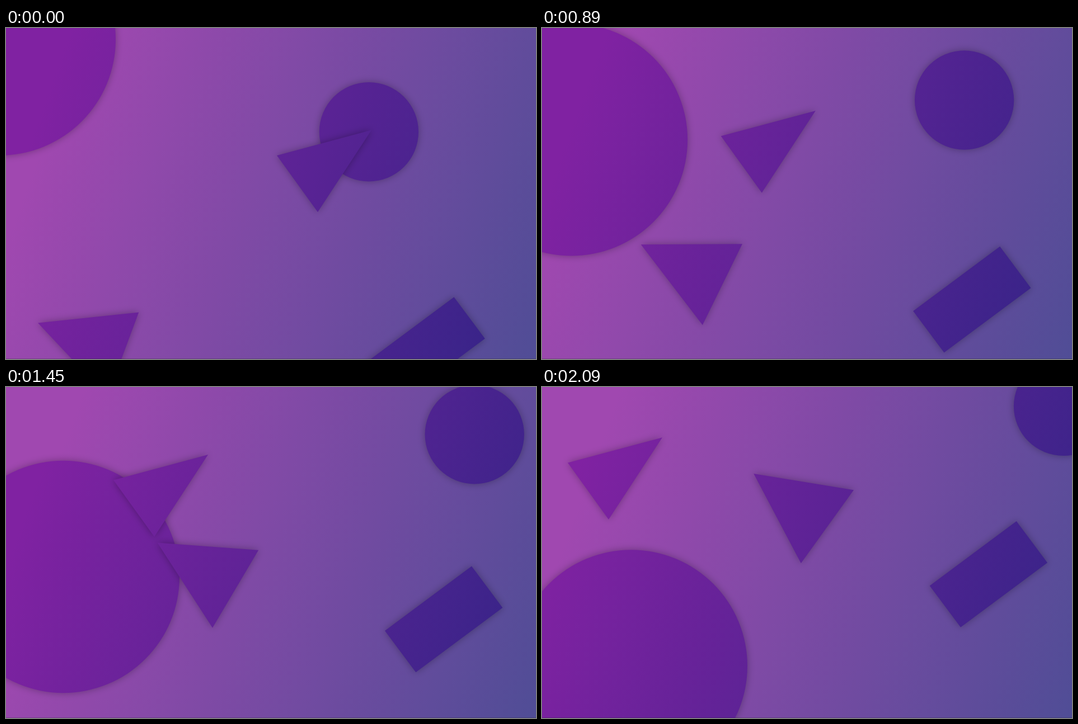
An HTML page with a canvas for the animation above (2.17 s loop, 947 px wide and 592 px high).

```html
<!DOCTYPE html>
<html lang="en">
<head>
<meta charset="utf-8">
<title>Drifting shapes</title>
<style>
html, body { margin: 0; width: 100%; height: 100%; overflow: hidden; background: #7f4ba5; }
canvas { display: block; }
</style>
</head>
<body>
<canvas id="stage" width="947" height="592"></canvas>
<script>
const W = 947, H = 592, LOOP = 2170, HOLD = 250, STEP = 80;
const ctx = document.getElementById('stage').getContext('2d');

// Diagonal gradient spanning the stage at 110 degrees
function diagonal(from, to, start) {
  const a = 20 * Math.PI / 180, c = Math.cos(a), s = Math.sin(a);
  const half = (W * c + H * s) / 2;
  const g = ctx.createLinearGradient(W / 2 - half * c, H / 2 - half * s,
                                     W / 2 + half * c, H / 2 + half * s);
  g.addColorStop(start, from);
  g.addColorStop(1, to);
  return g;
}

const backdrop = diagonal('rgb(160,72,176)', 'rgb(80,77,150)', 0.12);
const ink = diagonal('rgb(128,34,162)', 'rgb(50,36,134)', 0.1);

const circle = r => () => ctx.arc(0, 0, r, 0, Math.PI * 2);
const polygon = (...points) => () => {
  points.forEach(p => ctx.lineTo(...p));
  ctx.closePath();
};
const box = (w, h) => () => ctx.rect(-w / 2, -h / 2, w, h);

// Position, velocity per step, angle and turn per step in degrees
const shapes = [
  { x: -11.7, y: 20.4, vx: 7.125, vy: 19.94, path: circle(207.7) },
  { x: 648.4, y: 185.8, vx: 11.8, vy: -6.31, path: circle(88.7) },
  { x: 750.6, y: 576.1, vx: 1.97, vy: -10.05, angle: -36.7, path: box(193.4, 92.6) },
  { x: 484, y: 228, vx: -18.25, vy: -3.85, path: polygon([0, 0], [169, -45.4], [73, 101.3]) },
  { x: 154.6, y: 589.6, vx: 12.55, vy: -14.54, angle: -6.01, turn: 0.64,
    path: polygon([-90.5, -72], [90.7, -72], [19, 72.6]) }
];

function drawShape({ x, y, vx, vy, angle = 0, turn = 0, path }, n) {
  ctx.save();
  ctx.translate(x + vx * n, y + vy * n);
  ctx.rotate((angle + turn * n) * Math.PI / 180);
  ctx.beginPath();
  path();
  ctx.restore(); // the fill gradient stays fixed to the stage
  ctx.fill();
}

function draw(now) {
  const t = now % LOOP;
  const n = t < HOLD ? 0 : Math.floor((t - HOLD) / STEP) + 1;
  ctx.shadowColor = 'transparent';
  ctx.fillStyle = backdrop;
  ctx.fillRect(0, 0, W, H);
  ctx.shadowColor = 'rgba(0,0,0,0.3)';
  ctx.shadowBlur = 14;
  ctx.fillStyle = ink;
  shapes.forEach(s => drawShape(s, n));
  ctx.shadowColor = 'transparent';
  ctx.fillStyle = 'rgba(0,0,0,0.2)';
  ctx.fillRect(0, H - 1, W, 1);
}

function tick() {
  draw(performance.now());
  requestAnimationFrame(tick);
}
tick();
</script>
</body>
</html>
```
